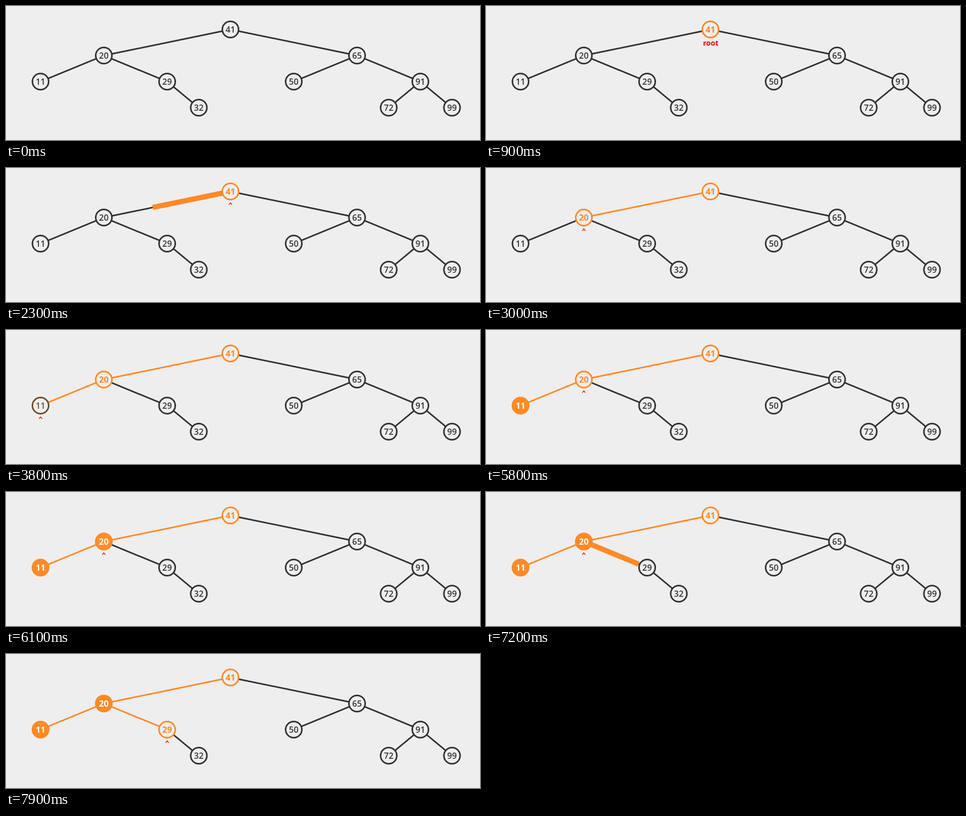
Animation of 906x257 px, one loop 8000 ms. Source, as an HTML page:

```html
<!DOCTYPE html>
<html lang="en">
<head>
<meta charset="utf-8">
<title>Inorder traversal</title>
<style>
  html, body { margin: 0; width: 100%; height: 100%; overflow: hidden; background: #eee; }
  svg { display: block; width: 906px; height: 257px; }
  text { font: 600 16px "Open Sans", "Noto Sans", sans-serif; text-anchor: middle; }
  circle, line { stroke-width: 3; }
  .thick { stroke-width: 10; }
  .root { font-size: 14px; font-weight: 700; fill: #f00; }
  .caret { fill: none; stroke: #f00; stroke-width: 1.4; }
</style>
</head>
<body>
<svg viewBox="0 0 906 257"></svg>
<script>
const LOOP = 8000, STEP = 100, FADE = 500;
const DARK = [51, 51, 51], ORANGE = [255, 138, 39], PAPER = [238, 238, 238], WHITE = [255, 255, 255];

// value: [x, y, parent]
const TREE = {
  41: [429, 45], 20: [187, 95, 41], 65: [671, 95, 41],
  11: [66, 145, 20], 29: [308, 145, 20], 50: [550, 145, 65], 91: [792, 145, 65],
  32: [368.5, 195, 29], 72: [731.5, 195, 91], 99: [852.5, 195, 91]
};

// Start times: edge growth, outline highlight, solid fill
const EVENTS = {
  41: { ring: 500 },
  20: { edge: 2026, ring: 2550, fill: 5725 },
  11: { edge: 3085, ring: 3590, fill: 4100 },
  29: { edge: 6780, ring: 7295 }
};

// Caret position over time
const CARETS = [[1600, 41], [2550, 20], [3590, 11], [5725, 20], [7295, 29]];

const svg = document.querySelector("svg");

function add(tag, attrs, text = "") {
  const el = document.createElementNS("http://www.w3.org/2000/svg", tag);
  for (const key in attrs) el.setAttribute(key, attrs[key]);
  el.textContent = text;
  return svg.appendChild(el);
}

function ease(t, start) {
  const u = Math.min(1, Math.max(0, (t - start) / FADE));
  return u < 0.5 ? 4 * u ** 3 : 1 - 4 * (1 - u) ** 3;
}

const blend = (a, b, k) => a.map((v, i) => v + (b[i] - v) * k);
const rgb = c => `rgb(${c.map(Math.round)})`;

function makeEdge(id) {
  const [x, y, parent] = TREE[id];
  const [px, py] = TREE[parent];
  const len = Math.hypot(x - px, y - py), r = 16;
  const dx = (x - px) / len, dy = (y - py) / len;
  const x1 = px + dx * r, y1 = py + dy * r;
  const x2 = x - dx * r, y2 = y - dy * r;
  return {
    ...EVENTS[id], x1, y1, x2, y2,
    line: add("line", { x1, y1, x2, y2, stroke: rgb(DARK) }),
    thick: EVENTS[id] && add("line", { x1, y1, x2, y2, stroke: rgb(ORANGE), class: "thick" })
  };
}

function makeNode(id) {
  const [cx, cy] = TREE[id];
  return {
    ...EVENTS[id],
    circle: add("circle", { cx, cy, r: 15.5, fill: rgb(PAPER), stroke: rgb(DARK) }),
    label: add("text", { x: cx, y: cy + 5.5, fill: rgb(DARK) }, id)
  };
}

const ids = Object.keys(TREE);
const edges = ids.filter(id => TREE[id][2]).map(makeEdge).filter(e => e.edge);
const nodes = ids.map(makeNode).filter(n => n.ring);
const rootLabel = add("text", { x: 429.5, y: 75.7, class: "root" }, "root");
const caret = add("path", { d: "M-3 25.2L0 21.8L3 25.2", class: "caret" });

function show(el, on) {
  el.style.visibility = on ? "visible" : "hidden";
}

function drawEdge(e, t) {
  const k = ease(t, e.edge);
  e.thick.setAttribute("x2", e.x1 + (e.x2 - e.x1) * k);
  e.thick.setAttribute("y2", e.y1 + (e.y2 - e.y1) * k);
  show(e.thick, k > 0 && t < e.ring);
  e.line.setAttribute("stroke", rgb(t < e.ring ? DARK : ORANGE));
}

function drawNode(n, t) {
  const ring = ease(t, n.ring);
  const fill = n.fill ? ease(t, n.fill) : 0;
  const color = blend(DARK, ORANGE, ring);
  n.circle.setAttribute("stroke", rgb(color));
  n.circle.setAttribute("fill", rgb(blend(PAPER, ORANGE, fill)));
  n.label.setAttribute("fill", rgb(blend(color, WHITE, fill)));
  n.label.style.fontWeight = ring < 0.5 ? 600 : 700;
}

function draw(t) {
  edges.forEach(e => drawEdge(e, t));
  nodes.forEach(n => drawNode(n, t));
  show(rootLabel, t >= 500 && t < CARETS[0][0]);
  const at = CARETS.filter(c => t >= c[0]).pop();
  show(caret, at);
  if (at) caret.setAttribute("transform", `translate(${TREE[at[1]].slice(0, 2)})`);
}

// The picture advances in steps of 100 ms
function tick() {
  const t = performance.now() % LOOP;
  draw(Math.floor(t / STEP) * STEP);
  requestAnimationFrame(tick);
}
tick();
</script>
</body>
</html>
```
